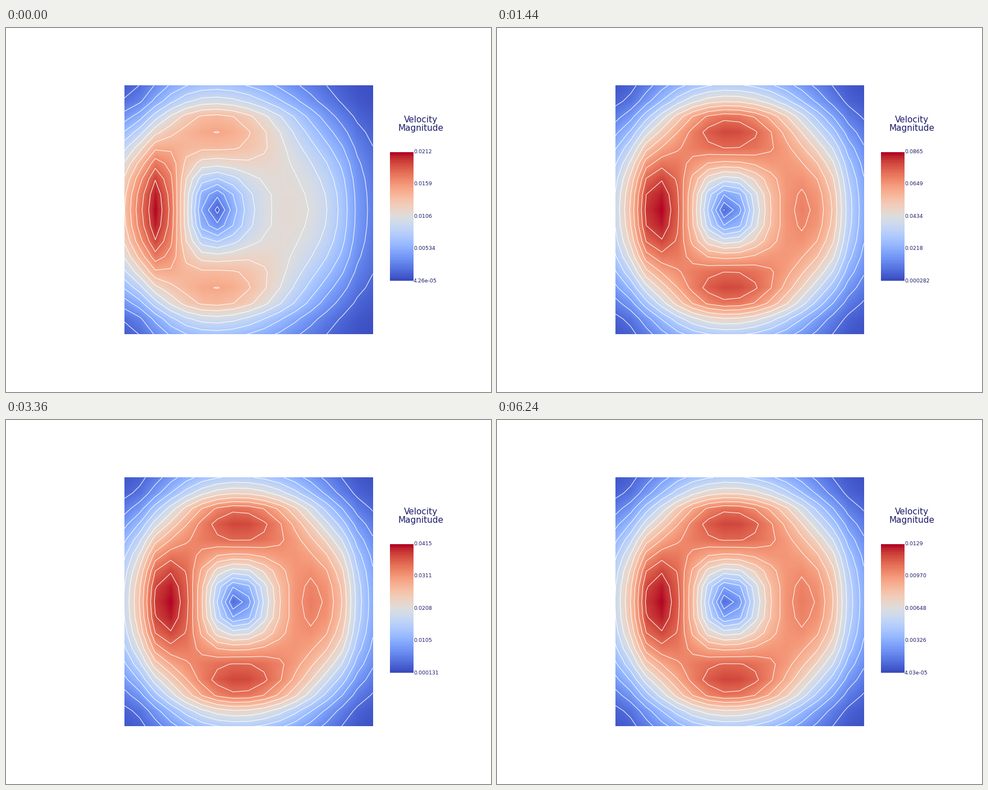
Recreate the animation shown at these times as a matplotlib script. Size 864 px wide and 648 px high, loop 6400 ms.

```python
import numpy as np
import matplotlib.pyplot as plt
from matplotlib.animation import FuncAnimation

W, H, DPI = 864, 648, 100
FRAMES, INTERVAL = 40, 160
CELLS, SIZE = 16, 443
LEFT, TOP = (W - SIZE) / 2, (H - SIZE) / 2
LEVELS = np.arange(1, 14) / 14
INK = "#1a1a68"

# Exponents (p, q) of the flow profile t^p (1-t)^q from a wall to the vortex
# centre: left wall, right wall, top and bottom walls.
START = np.array([(.75, 1.75), (.87, .74), (.77, 1.38)])
SETTLED = np.array([(.84, 1.4), (.87, 1.07), (.84, 1.4)])


def profile(centre, near, far):
    """Stream function and its slope in each cell, zero at both walls."""
    s = np.arange(CELLS) + .5

    def side(t, p, q):
        t = np.clip(t, 0, 1)
        h = t ** p * (1 - t) ** q
        return h / h.sum()

    slope = np.concatenate([
        side(s[s < centre] / centre, *near),
        -side((CELLS - s[s >= centre]) / (CELLS - centre), *far)])
    return np.cumsum(slope) - slope / 2, slope


def to_nodes(cells):
    """Average neighbouring cells onto the grid nodes."""
    padded = np.pad(cells, 1, mode="edge")
    return (padded[1:] + padded[:-1]) / 2


def field(i):
    """Speed at the grid nodes, scaled to a maximum of one."""
    done = 1 - (1 + i) ** -1.15
    left, right, side = START + (SETTLED - START) * done
    centre = 6.05 + 1.31 * done ** .3
    x, dx = map(to_nodes, profile(centre, left, right))
    y, dy = (to_nodes(a)[:, None] for a in profile(CELLS / 2, side, side))
    # The left corners of the ring lose a little speed as the flow settles.
    dip = .8 * done * x * (1 - x) * y * (1 - y) * (dx > 0)
    v = np.hypot(x * dy, dx * y) * (1 - dip)
    return v / v.max()


def value_range(i):
    """A steady push speeds the flow up, then it decays."""
    push = .02122 + .050775 * i
    decay = .16783 * np.exp(-.0657 * i - .205 * np.exp(-i / 8.6))
    high = min(push, decay)
    ratio = .00312 + .00045 * np.exp(-i / 8) - .001562 * np.exp(-i / 1.24)
    return high * ratio, high


def hat_weights():
    """Linear interpolation from grid nodes to pixel centres."""
    pos = (np.arange(SIZE) + .5) * CELLS / SIZE
    return np.clip(1 - abs(pos[:, None] - np.arange(CELLS + 1)), 0, 1)


fig = plt.figure(figsize=(W / DPI, H / DPI), dpi=DPI, facecolor="white")
ax = fig.add_axes([0, 0, 1, 1])
ax.set_axis_off()


def shaded(data, x0, y0, x1, y1):
    return ax.imshow(data, cmap="coolwarm", vmin=0, vmax=1,
                     extent=(x0, x1, y1, y0), interpolation="nearest")


def text(x, y, s, px, ha):
    return ax.text(x, y, s, fontsize=px * 72 / DPI, family="DejaVu Sans",
                   color=INK, ha=ha, va="baseline")


weights = hat_weights()
steps = np.arange(CELLS + 1) * SIZE / CELLS
image = shaded(np.zeros((SIZE, SIZE)), LEFT, TOP, LEFT + SIZE, TOP + SIZE)
shaded(np.linspace(1, 0, 64)[:, None], 683.5, 221.5, 725, 450.5)
ax.set_aspect("auto")
ax.set_xlim(0, W)
ax.set_ylim(H, 0)

text(738.5, 168, "Velocity", 15.3, "center")
text(738.5, 183, "Magnitude", 15.3, "center")
labels = [text(726, 452.8 - 57.5 * k, "", 9.4, "left") for k in range(5)]
contours = []


def draw(i):
    while contours:
        contours.pop().remove()
    v = field(i)
    image.set_data(weights @ v @ weights.T)
    contours.append(ax.contour(LEFT + steps, TOP + steps, v, LEVELS,
                               colors="white", linewidths=.72, zorder=3))
    low, high = value_range(i)
    for k, label in enumerate(labels):
        label.set_text(f"{low + (high - low) * k / 4:#.3g}")
    return [image, *labels]


anim = FuncAnimation(fig, draw, frames=FRAMES, interval=INTERVAL,
                     init_func=lambda: draw(0), repeat=True, repeat_delay=0,
                     blit=False)
plt.show()
```
